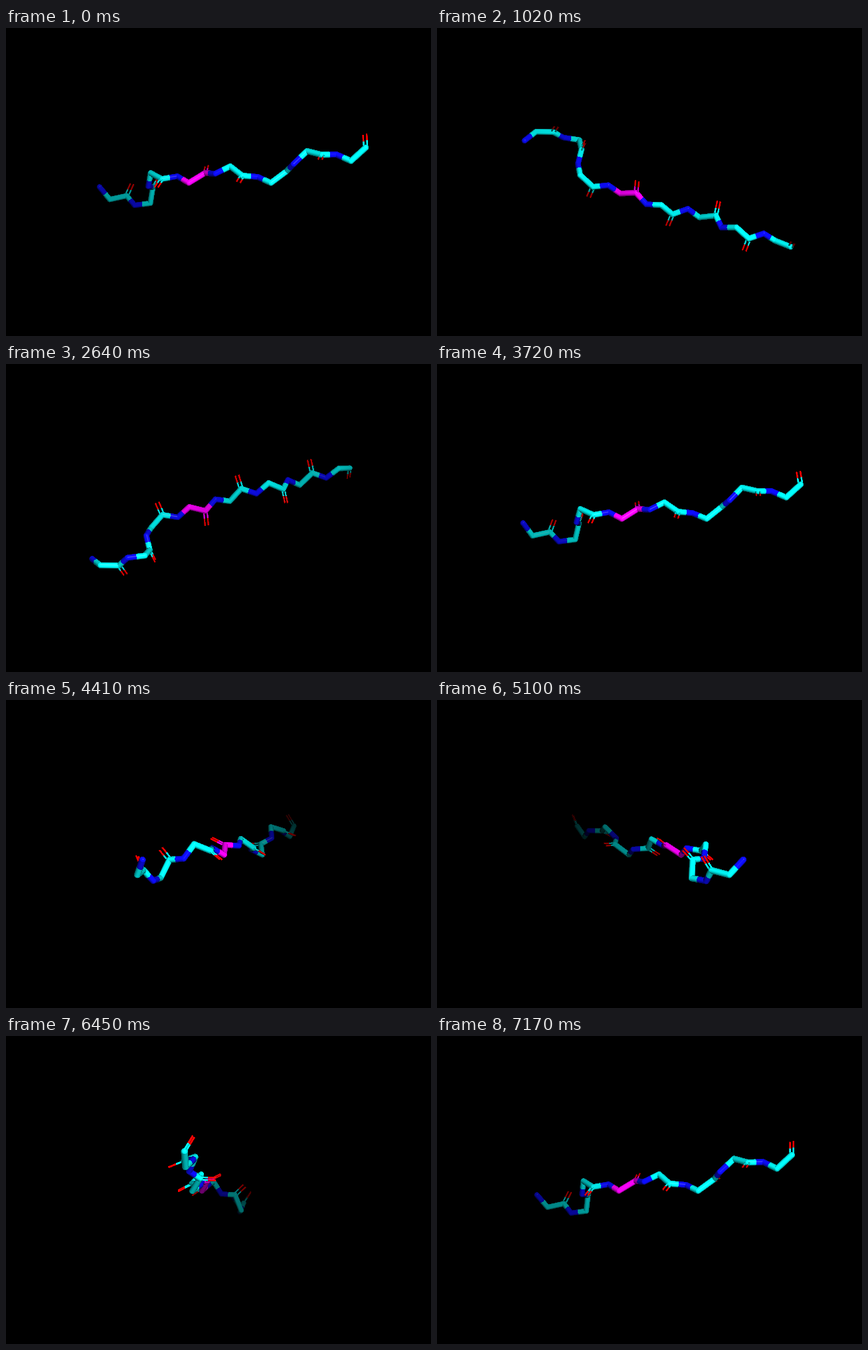
Recreate the animation shown at these times as a matplotlib script. Size 640 px wide and 464 px high, loop 7200 ms.

```python
import numpy as np
import matplotlib.pyplot as plt
from matplotlib.animation import FuncAnimation

W, H, DPI = 640, 464, 64
FRAMES, INTERVAL = 240, 30
HALF = FRAMES // 2
STEP = 360 / HALF
CAMERA = 1316               # eye distance in pixels (20 degree view)
STICK, THIN, GAP = 4.5, 1.35, 2.8

CYAN, BLUE, RED, MAGENTA = map(np.array, (
    (0., 1, 1), (.05, .05, 1), (1., 0, 0), (1., 0, 1)))

# Backbone atoms N, CA, C, O of each residue; y points down, z to the viewer
ATOMS = np.array([
    (-188.3, 7.3, -62.3), (-173.5, 27.3, -73.8), (-146.7, 21.5, -73.8), (-139.2, 2.5, -84.8),
    (-133, 36.3, -63.9), (-108, 33, -60.4), (-103, 7.5, -48.8), (-95.8, -7.5, -63.3),
    (-108.5, 6.1, -27.2), (-103.7, -14.1, -13.2), (-85.5, -5, 6.1), (-93, 8, 23.3),
    (-62.3, -9, 3), (-44.7, .8, 17.2), (-20.6, -13.9, 13.7), (-18.6, -24, -7.2),
    (-5.3, -12.7, 31.4), (16.8, -23.5, 30.4), (34, -9.6, 47.3), (27.3, .8, 66.3),
    (57, -7.8, 39.2), (75.2, .8, 54), (98.6, -16.4, 47.8), (103, -15.4, 25.8),
    (106.7, -26, 64.2), (126.7, -44.9, 59.8), (146, -39, 78), (140.6, -30.5, 98),
    (167.7, -39.7, 70.2), (186.3, -30.1, 83.2), (206.2, -48.7, 88), (207, -67.8, 76.4),
]).reshape(8, 4, 3)
TAGGED = 3                  # residue with magenta carbons


def unit(v):
    return v / np.linalg.norm(v)


LIGHT = unit(np.array([.4, -.4, 1]))
SHINE = unit(LIGHT + [0, 0, 1])


def build():
    """Return joints (point, colour) and sticks (start, end, radius, colours)."""
    joints, sticks = [], []
    for i, (n, ca, c, o) in enumerate(ATOMS):
        carbon = MAGENTA if i == TAGGED else CYAN
        joints += [(n, BLUE), (ca, carbon), (c, carbon)]
        sticks += [(n, ca, STICK, BLUE, carbon), (ca, c, STICK, carbon, carbon)]
        if i + 1 < len(ATOMS):
            sticks.append((c, ATOMS[i + 1, 0], STICK, carbon, BLUE))
        axis = unit(o - c)
        side = c - ca
        side = GAP * unit(side - side.dot(axis) * axis)
        for s in (side, -side):
            sticks.append((c + s, o + s, THIN, carbon, RED))
    return joints, sticks


JOINTS, STICKS = build()


def rotation(k):
    """One turn about x, then one about y; the first pose is held once."""
    if k <= HALF + 1:
        a = np.radians(STEP * max(k - 1, 0))
        c, s = np.cos(a), np.sin(a)
        return np.array([(1, 0, 0), (0, c, s), (0, -s, c)])
    a = np.radians(STEP * (k - HALF - 1))
    c, s = np.cos(a), np.sin(a)
    return np.array([(c, 0, s), (0, 1, 0), (-s, 0, c)])


def project(p, rot):
    p = rot @ p
    zoom = CAMERA / (CAMERA - p[2])
    return p * zoom + (W / 2, H / 2, 0), zoom


def window(p, q, r):
    """Pixel slices around a segment, with their coordinates relative to p."""
    lo = np.maximum(np.floor(np.minimum(p, q)[:2] - r).astype(int), 0)
    hi = np.minimum(np.ceil(np.maximum(p, q)[:2] + r).astype(int) + 1, (W, H))
    dx = np.arange(lo[0], hi[0])[None, :] - p[0]
    dy = np.arange(lo[1], hi[1])[:, None] - p[1]
    return (slice(lo[1], hi[1]), slice(lo[0], hi[0])), dx, dy


def shade(img, depth, box, hit, z, normal, colour):
    hit = hit & (z > depth[box])
    if not hit.any():
        return
    z = z[hit]
    n = np.stack([np.broadcast_to(a, hit.shape)[hit] for a in normal], axis=1)
    glow = .14 + .45 * n[:, 2] + .45 * np.maximum(n @ LIGHT, 0)
    glint = .3 * np.maximum(n @ SHINE, 0) ** 80
    fog = np.clip((z + 200) / 223, 0, 1)
    rgb = colour[hit] if colour.ndim == 3 else colour
    rgb = rgb * np.minimum(1.2 * glow, 1)[:, None] + glint[:, None]
    depth[box][hit] = z
    img[box][hit] = np.clip(rgb, 0, 1) * fog[:, None]


def draw_ball(img, depth, p, r, colour):
    box, dx, dy = window(p, p, r)
    u, v = dx / r, dy / r
    d = u * u + v * v
    h = np.sqrt(np.maximum(1 - d, 0))
    shade(img, depth, box, d < 1, p[2] + r * h, (u, v, h), colour)


def draw_stick(img, depth, p, q, r, first, second):
    v = q - p
    length, flat = np.linalg.norm(v), np.hypot(v[0], v[1])
    if flat < .02 * length:
        return
    ex, ey = v[:2] / flat
    c, az = flat / length, v[2] / length
    box, dx, dy = window(p, q, r)
    u = (dy * ex - dx * ey) / r
    h = np.sqrt(np.maximum(1 - u * u, 0))
    s = (dx * ex + dy * ey + r * h * az) / c
    hit = (abs(u) < 1) & (s >= 0) & (s <= length)
    normal = (-ey * u - az * ex * h, ex * u - az * ey * h, c * h)
    colour = np.where((s < length / 2)[..., None], first, second)
    shade(img, depth, box, hit, p[2] + s * az + r * h * c, normal, colour)


def render(k):
    rot = rotation(k)
    img = np.zeros((H, W, 3))
    depth = np.full((H, W), -np.inf)
    for a, b, r, first, second in STICKS:
        p, zp = project(a, rot)
        q, zq = project(b, rot)
        draw_stick(img, depth, p, q, r * (zp + zq) / 2, first, second)
    for a, colour in JOINTS:
        p, zoom = project(a, rot)
        draw_ball(img, depth, p, STICK * zoom, colour)
    return img


fig = plt.figure(figsize=(W / DPI, H / DPI), dpi=DPI, facecolor="black")
ax = fig.add_axes([0, 0, 1, 1])
ax.axis("off")
view = ax.imshow(render(0), interpolation="nearest", aspect="auto")


def update(k):
    view.set_data(render(k))
    return [view]


anim = FuncAnimation(fig, update, frames=FRAMES, interval=INTERVAL,
                     repeat=True, repeat_delay=0, blit=False)
plt.show()
```
